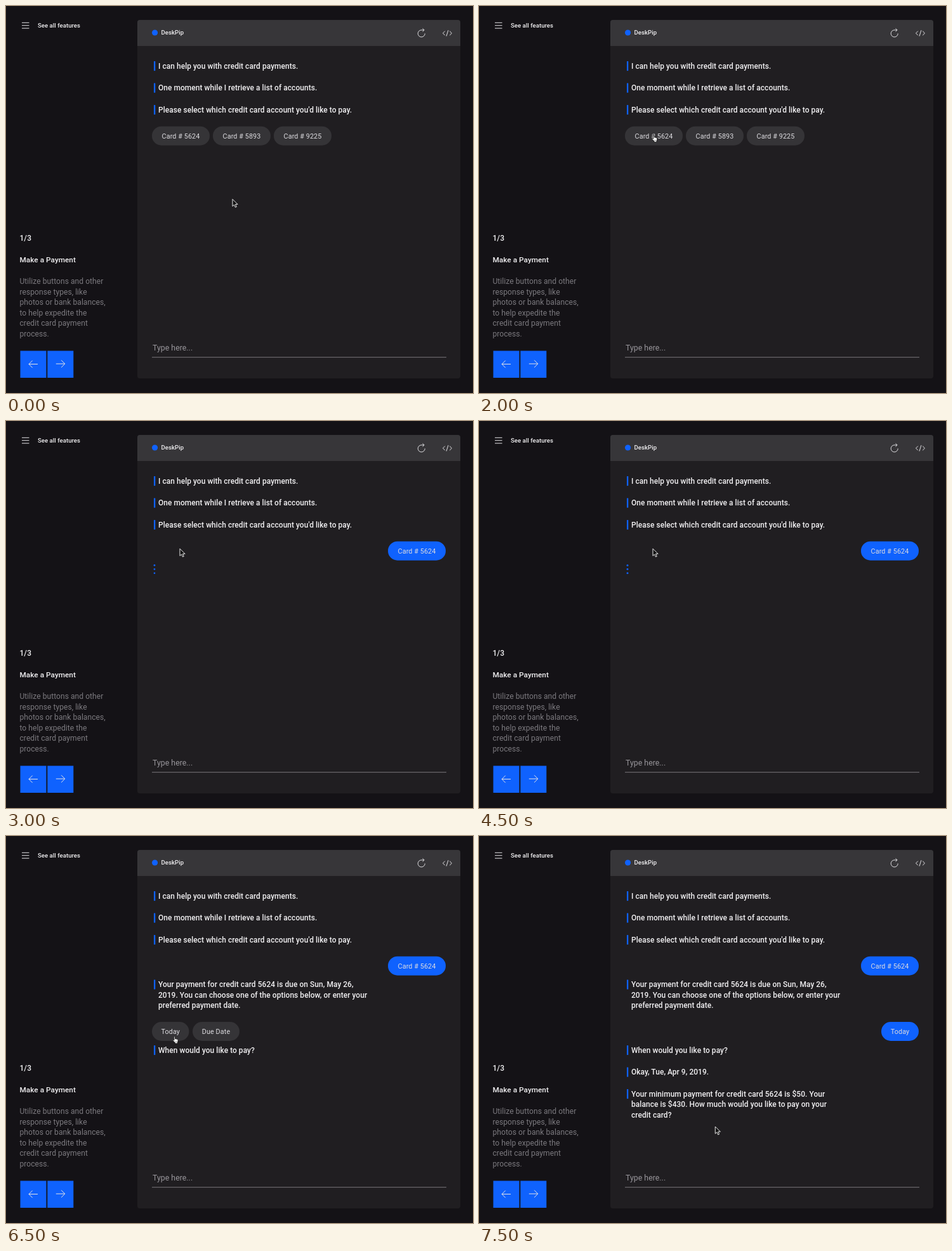
These frames come from a looping animation (736 px wide and 610 px high, 8 s). An HTML page:

```html
<!DOCTYPE html>
<html lang="en">
<head>
<meta charset="utf-8">
<title>Payment chat</title>
<style>
  html, body { margin: 0; width: 100%; height: 100%; overflow: hidden; background: #141216; }
  svg { display: block; }
  text { font: 500 12px Roboto, sans-serif; fill: #f1f0f2; letter-spacing: .03px; }
  .small { font-size: 9.6px; }
  .title { font-size: 11.8px; }
  .body { font-size: 12.1px; font-weight: 400; fill: #7b797e; }
  .hint { font-size: 12.3px; font-weight: 400; fill: #98969b; }
  .pill { font-size: 10.8px; font-weight: 400; letter-spacing: .1px; text-anchor: middle; fill: #dddce0; }
  .icon { fill: none; stroke: #e4e3e6; stroke-width: 1; }
</style>
</head>
<body>
<svg width="736" height="610" viewBox="0 0 736 610">
  <rect width="736" height="610" fill="#141216"/>
  <path class="icon" d="M25 26.3h11.5M25 30.7h11.5M25 35.1h11.5"/>
  <text class="small" x="50" y="34">See all features</text>

  <text x="21.5" y="369.5">1/3</text>
  <text class="title" x="21.5" y="404">Make a Payment</text>
  <g id="about"></g>

  <path fill="#0f62fe" d="M22.5 543.5h41v42.5h-41zM65.3 543.5h41v42.5h-41z"/>
  <path class="icon" d="M50 564.5H36M41.7 558.8L36 564.5l5.7 5.7M78.8 564h14M87.1 558.3l5.7 5.7-5.7 5.7"/>

  <rect x="207" y="22" width="509" height="565" rx="4" fill="#201e21"/>
  <path fill="#373639" d="M207 63V26a4 4 0 0 1 4-4h501a4 4 0 0 1 4 4v37z"/>
  <circle cx="234.6" cy="42" r="4.6" fill="#0f62fe"/>
  <text class="small" x="244.5" y="45.3">DeskPip</text>
  <path class="icon" d="M660.2 43.4a5.5 5.5 0 1 1-5.5-5.5h4.3M656.6 35.4l2.5 2.5-2.5 2.5"/>
  <path class="icon" d="M691.8 39.6l-3.3 3.3 3.3 3.3M699.2 39.6l3.3 3.3-3.3 3.3M697 38.2l-3 9.4"/>

  <text class="hint" x="231" y="542.5">Type here...</text>
  <path d="M230 553.7h464" stroke="#79777c"/>
  <g id="chat"></g>
</svg>
<script>
const STEP = 500, LOOP = 8000;
const el = id => document.getElementById(id);

const lines = (x, y, rows, cls = '') =>
  rows.map((s, i) => `<text class="${cls}" x="${x}" y="${y + 4.3 + i * 16.5}">${s}</text>`).join('');

const message = (y, ...rows) =>
  `<rect x="233" y="${y - 7.4}" width="2.3" height="15" fill="#0f62fe"/>` + lines(240, y, rows);

const pill = (x, y, w, label, fill = '#353437') =>
  `<rect x="${x}" y="${y - 15}" width="${w}" height="30" rx="15" fill="${fill}"/>
   <text class="pill" x="${x + w / 2}" y="${y + 4}">${label}</text>`;

const sent = (x, y, w, label) => pill(x, y, w, label, '#0f62fe');

// Typing indicator: pulsing dots, all full size just before the reply
const dots = (y, beat) => [0, 1, 2].map(i => {
  const r = 1.5 - .4 * Math.abs(Math.sin(beat * (i + 1)));
  return `<circle cx="234" cy="${y + (i - 1) * 6.2}" r="${r}" fill="#0f62fe"/>`;
}).join('');

const faintDots = '<path d="M234 231v2m0 3v2m0 3v2" stroke="#403f43"/>';

const arrow = `<path d="M0 0v11.2l2.6-2.4 1.8 4 1.9-.8-1.8-3.9h3.6z"
  fill="#111" stroke="#fff" stroke-width=".9" stroke-linejoin="round"/>`;
const hand = `<path d="M2.2 1.2c0-1.1 1.5-1.1 1.6 0l.5 3.4c.4-.7 1.3-.5 1.5.2.5-.6 1.4-.3 1.5.3
  .6-.4 1.4 0 1.4.8v2.1L7.9 10v1.6H4v-1.4L.8 7.1c-.7-.9.4-1.7 1.2-1l.8.7z"
  fill="#fff" stroke="#111" stroke-width=".8" stroke-linejoin="round"/>
  <path d="M4.9 8v2M6.3 8v2" stroke="#333" stroke-width=".5"/>`;

// Pointer position at each step
const path = [
  [357, 304.5], [357, 304], [299.8, 274.5], [271.5, 201.8], [272, 202.8],
  ...Array(5).fill([274, 201.3]),
  [339.3, 353.6], [339, 353.3], [278.6, 325.5], [262.3, 315.4], [340.5, 417.5], [372.3, 458]
];
const handSteps = [3, 4, 13];

function chat(k) {
  let s = message(94.5, 'I can help you with credit card payments.')
        + message(129, 'One moment while I retrieve a list of accounts.')
        + message(163.5, "Please select which credit card account you'd like to pay.");

  if (k < 5)
    s += ['5624', '5893', '9225'].map((n, i) => pill(230 + i * 96, 204.7, 91, 'Card # ' + n)).join('');
  else
    s += sent(k === 5 ? 473.5 : 602, 204.7, 91, 'Card # 5624');

  if (k === 5) s += faintDots;
  else if (k > 5 && k < 10) s += dots(233.6, 9 - k);

  if (k > 9) {
    s += message(234, 'Your payment for credit card 5624 is due on Sun, May 26,',
      '2019. You can choose one of the options below, or enter your', 'preferred payment date.');
    s += k < 14 ? pill(230, 308, 58.5, 'Today') + pill(294, 308, 74, 'Due Date')
                : sent(634, 308, 59, 'Today');
    s += message(337.5, 'When would you like to pay?');
  }
  if (k === 14) s += dots(372, 1);
  if (k === 15)
    s += message(372, 'Okay, Tue, Apr 9, 2019.')
       + message(406.5, 'Your minimum payment for credit card 5624 is $50. Your',
           'balance is $430. How much would you like to pay on your', 'credit card?');

  const [x, y] = path[k];
  return s + `<g transform="translate(${x} ${y})">${handSteps.includes(k) ? hand : arrow}</g>`;
}

el('about').innerHTML = lines(21.5, 434, ['Utilize buttons and other', 'response types, like',
  'photos or bank balances,', 'to help expedite the', 'credit card payment', 'process.'], 'body');

let shown = -1;
const start = performance.now();
function draw() {
  const k = Math.floor((performance.now() - start) % LOOP / STEP);
  if (k !== shown) el('chat').innerHTML = chat(shown = k);
  requestAnimationFrame(draw);
}
draw();
</script>
</body>
</html>
```
